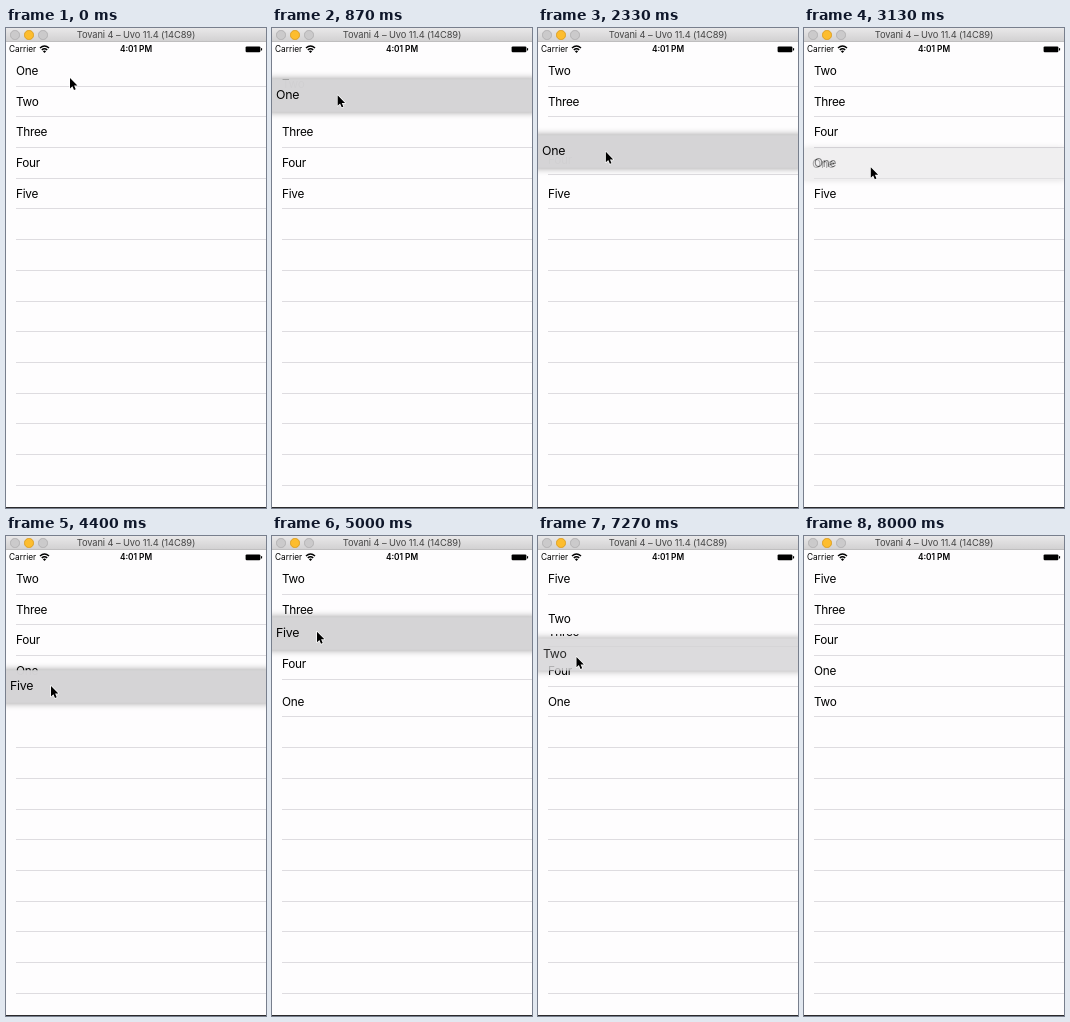
Recreate the animation shown at these times as an HTML page. Size 260 px wide and 480 px high, loop 8.67 s.

```html
<!DOCTYPE html>
<html lang="en">
<head>
<meta charset="utf-8">
<title>Reorderable list</title>
<style>
  html, body { margin: 0; width: 100%; height: 100%; overflow: hidden; }
  #stage { position: relative; width: 260px; height: 480px; overflow: hidden; background: #fefdfe; font-family: Inter, "Liberation Sans", sans-serif; color: #000; }
  #stage div, #stage svg { position: absolute; white-space: nowrap; }
  .line { left: 10px; width: 250px; height: 1px; background: #dedce0; }
  .row { left: 0; width: 260px; height: 30.7px; background: #fefdfe; }
  .row .label, #lifted { font-size: 11.8px; letter-spacing: -.28px; line-height: 30.7px; }
  .label { left: 10px; top: 0; }
  .row .line { top: 29.7px; }
  .row.pressed { background: #d9d8da; }
  .row.taken .line { display: none; }
  #lifted { left: 0; width: 260px; height: 30.7px; background: #d5d4d6; box-shadow: 0 0 7px rgba(0, 0, 0, .4); z-index: 5; }
  #status { top: 14px; width: 260px; height: 14px; font-size: 8.3px; line-height: 14px; z-index: 6; }
  #carrier { left: 3px; top: 0; }
  #clock { left: 0; top: 0; width: 260px; text-align: center; font-weight: 600; }
  #title { top: 0; width: 260px; height: 13px; background: linear-gradient(#e9e8e9, #d2d1d2); border-bottom: 1px solid #bfbebf; font-size: 9.3px; letter-spacing: -.1px; line-height: 13px; text-align: center; color: #454545; z-index: 7; }
  .light { top: 2px; width: 7.5px; height: 7.5px; border-radius: 50%; background: #cbcacb; border: .5px solid #b4b3b4; }
  #pointer { left: 0; top: 0; z-index: 9; overflow: visible; }
  #edge { top: 479px; width: 260px; height: 1px; background: #2b2a2c; z-index: 6; }
</style>
</head>
<body>
<div id="stage">
  <div id="table"></div>
  <div id="lifted"><div class="label"></div></div>
  <div id="status">
    <div id="carrier">Carrier</div>
    <svg style="left:33px;top:2px" width="11" height="10" fill="none" stroke="#000" stroke-width="1.5">
      <path d="M1 4Q5.5 0 10 4M2.8 6Q5.5 3.6 8.2 6"/>
      <path d="M3.9 7.2Q5.5 5.9 7.1 7.2L5.5 9Z" fill="#000" stroke="none"/>
    </svg>
    <div id="clock">4:01 PM</div>
    <svg style="left:239px;top:4px" width="18" height="7">
      <rect x=".6" y=".4" width="14.8" height="5.8" rx="1.2"/>
      <rect x="16" y="2" width="1.1" height="2.6" rx=".6"/>
    </svg>
  </div>
  <div id="title">Tovani 4 – Uvo 11.4 (14C89)
    <div class="light" style="left:4px"></div>
    <div class="light" style="left:18px;background:#fdbd2e;border-color:#dfa023"></div>
    <div class="light" style="left:32px"></div>
  </div>
  <div id="edge"></div>
  <svg id="pointer" width="9" height="14">
    <path d="M0 0V10.4L2.4 8.2L4 12L5.7 11.3L4.1 7.6H7.4Z" stroke="#fff" stroke-width="1.4" stroke-linejoin="round" paint-order="stroke"/>
  </svg>
</div>
<script>
const LOOP = 8670, STEP = 200 / 3, TOP = 28, PITCH = 30.7;
const LIFT = 250, SLIDE = 300, LAG = 10, POINTER_GONE = 7990;
const names = ['One', 'Two', 'Three', 'Four', 'Five'];

const drags = [
  { name: 'One', from: 0, to: 3, press: 130, lift: 455, drop: 2980 },
  { name: 'Five', from: 4, to: 0, press: 3797, lift: 4115, drop: 5772 },
  { name: 'Two', from: 1, to: 4, press: 6727, lift: 7080, drop: 7715 }
];

// time, dragged row, displaced row, direction of the dragged row
const swaps = [
  [700, 'One', 'Two', 1], [1655, 'One', 'Three', 1], [2270, 'One', 'Four', 1],
  [4420, 'Five', 'One', -1], [4790, 'Five', 'Four', -1],
  [5050, 'Five', 'Three', -1], [5340, 'Five', 'Two', -1],
  [7160, 'Two', 'Three', 1], [7285, 'Two', 'Four', 1], [7440, 'Two', 'One', 1]
];

// pointer path: time, x, y
const path = [
  [0, 64, 50], [430, 64, 50], [700, 65, 60], [1200, 67, 82], [1480, 67, 82],
  [1667, 68, 93], [2270, 68, 121], [2667, 67, 139], [3130, 67, 139],
  [3467, 45, 163], [4090, 45, 163], [4400, 45, 150], [4790, 45, 120],
  [5050, 45, 90], [5340, 44, 58], [5600, 44, 40], [5867, 44, 40],
  [6400, 38, 73], [7030, 38, 73], [7160, 38, 90], [7267, 38.5, 121],
  [7440, 39, 152], [7560, 39, 163], [7735, 39, 163], [7933, 182, 20],
  [LOOP, 182, 20]
];

const $ = id => document.getElementById(id);
const ease = p => (p = Math.min(1, Math.max(0, p)), p * p * (3 - 2 * p));
const mix = (a, b, p) => a + (b - a) * p;
const slotTop = slot => TOP + PITCH * slot;
const slotCenter = slot => slotTop(slot + .5);

function add(parent, className, text = '') {
  const el = document.createElement('div');
  el.className = className;
  el.textContent = text;
  parent.append(el);
  return el;
}

for (let slot = 5; slot < 14; slot++) {
  add($('table'), 'line').style.top = Math.round(slotTop(slot + 1) - 1) + 'px';
}
const rows = names.map(name => {
  const el = add($('table'), 'row');
  add(el, 'label', name);
  add(el, 'line');
  return el;
});
const lifted = $('lifted'), liftedLabel = lifted.firstChild;

function pointerAt(t) {
  const i = Math.max(1, path.findIndex(k => k[0] > t));
  const a = path[i - 1], b = path[i];
  const p = Math.max(0, (t - a[0]) / (b[0] - a[0]));
  return [mix(a[1], b[1], p), mix(a[2], b[2], p)];
}

function drawRows(t, drag) {
  const slots = Object.fromEntries(names.map((name, i) => [name, i]));
  for (const [start, mover, other, dir] of swaps) {
    const shift = dir * ease((t - start) / SLIDE);
    slots[mover] += shift;
    slots[other] -= shift;
  }
  names.forEach((name, i) => {
    const row = rows[i];
    const active = Boolean(drag && drag.name === name);
    let alpha = 1;
    if (active && t >= drag.drop) alpha = ease((t - drag.drop) / LIFT);
    else if (active && t >= drag.lift + LIFT) alpha = 0;
    row.style.top = slotTop(slots[name]) + 'px';
    row.style.opacity = alpha;
    row.style.zIndex = active ? 2 : 1;
    row.classList.toggle('pressed', active && t < drag.lift);
    row.classList.toggle('taken', active && t < drag.drop);
  });
}

function drawLifted(t, drag) {
  const visible = drag && t >= drag.lift;
  lifted.style.display = visible ? 'block' : 'none';
  if (!visible) return;
  const up = ease((t - drag.lift) / LIFT), down = ease((t - drag.drop) / LIFT);
  const held = pointerAt(Math.min(t, drag.drop) - LAG)[1];
  const follow = Math.min(1, up * 1.3);
  const center = mix(mix(slotCenter(drag.from), held, follow), slotCenter(drag.to), down);
  liftedLabel.textContent = drag.name;
  lifted.style.top = center - PITCH / 2 + 'px';
  lifted.style.opacity = .98 * up * (1 - down);
  lifted.style.transform = `scale(${1 + .05 * up * (1 - down)})`;
}

function draw(now) {
  const t = Math.floor((now % LOOP + 4) / STEP) * STEP;
  const drag = drags.find(d => t >= d.press && t < d.drop + LIFT);
  const [x, y] = pointerAt(t);
  drawRows(t, drag);
  drawLifted(t, drag);
  $('pointer').style.transform = `translate(${x}px, ${y}px)`;
  $('pointer').style.display = t < POINTER_GONE ? 'block' : 'none';
}

const began = performance.now();
function tick() {
  draw(performance.now() - began);
  requestAnimationFrame(tick);
}
tick();
</script>
</body>
</html>
```
